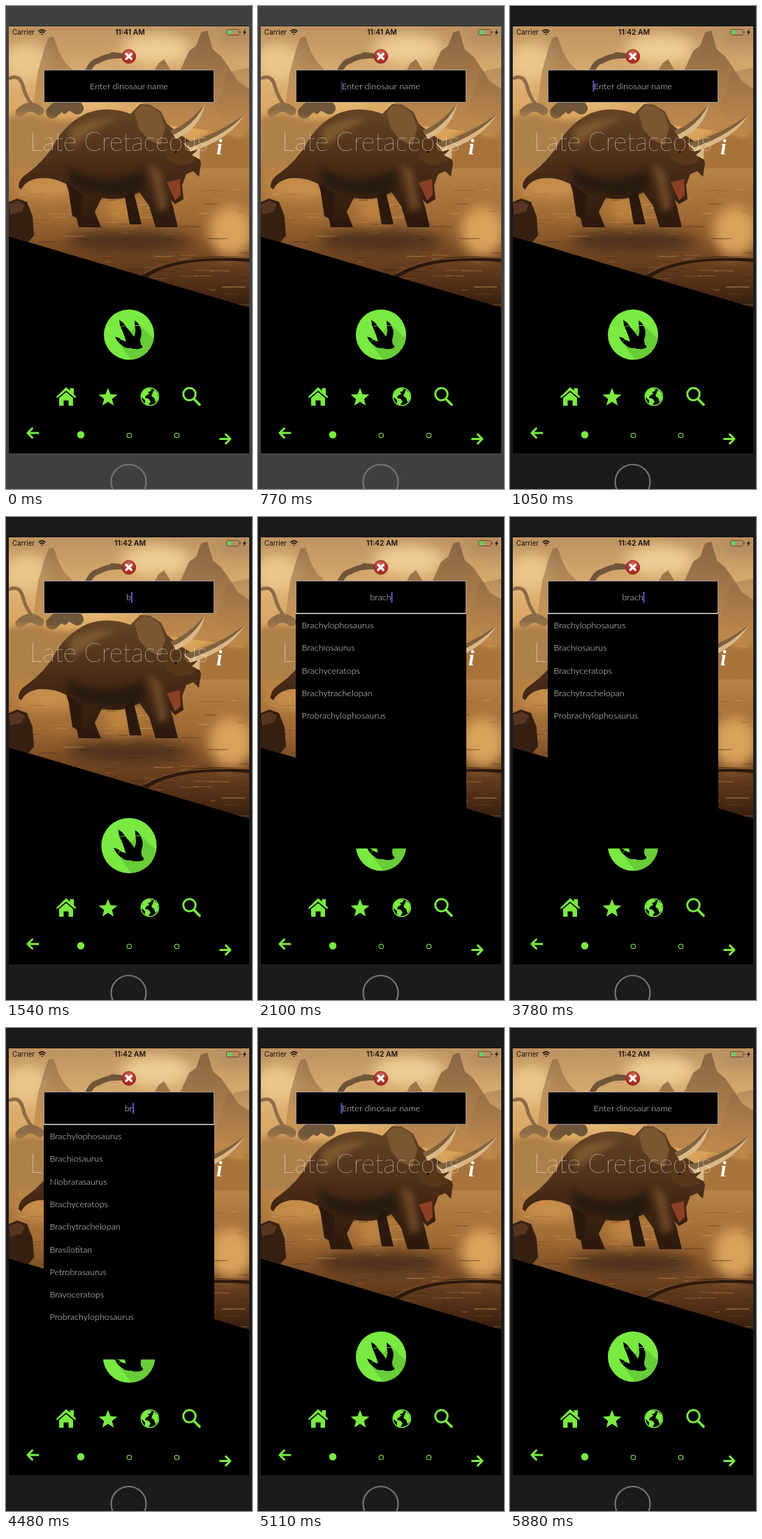
Recreate the animation shown at these times as an HTML page. Size 352x690 px, loop 5950 ms.

```html
<!DOCTYPE html>
<html lang="en">
<head>
<meta charset="utf-8">
<title>Dinosaur search</title>
<style>
  html, body { margin: 0; width: 100%; height: 100%; overflow: hidden; background: #1b1b1b; }
  svg { display: block; }
  .thin { font-family: Lato, "Open Sans", sans-serif; font-weight: 300; font-size: 12.6px; fill: #e2e2e2; }
  .title { font-size: 37px; font-weight: 200; fill: #fff; }
  .mid { text-anchor: middle; }
  .status { font-family: Inter, "Liberation Sans", sans-serif; font-size: 9.8px; fill: #16100a; }
  .bold { font-weight: 600; font-size: 10.3px; }
  .info { font: italic bold 31px "Liberation Serif", serif; fill: #fff; }
  .line { fill: none; stroke: #7aea42; stroke-linecap: round; stroke-linejoin: round; }
</style>
</head>
<body>
<svg width="352" height="690" viewBox="0 0 352 690">
  <defs>
    <clipPath id="scene"><path d="M4 29H348V431L4 329Z"/></clipPath>
    <clipPath id="disc"><circle r="36"/></clipPath>
    <filter id="soft" x="-30%" y="-30%" width="160%" height="160%"><feGaussianBlur stdDeviation="9"/></filter>
    <filter id="edge"><feGaussianBlur stdDeviation=".7"/></filter>
    <filter id="shade"><feGaussianBlur stdDeviation="4"/></filter>
    <linearGradient id="sky" x2="0" y2="1">
      <stop offset="0" stop-color="#bd9362"/>
      <stop offset=".35" stop-color="#dcae70"/>
      <stop offset=".7" stop-color="#d9a258"/>
      <stop offset="1" stop-color="#b27a3e"/>
    </linearGradient>
    <linearGradient id="water" x2="0" y2="1">
      <stop offset="0" stop-color="#b78245"/>
      <stop offset=".35" stop-color="#a06a34"/>
      <stop offset=".65" stop-color="#6d4220"/>
      <stop offset="1" stop-color="#331b0d"/>
    </linearGradient>
    <linearGradient id="hide" x2="0" y2="1">
      <stop offset="0" stop-color="#684626"/>
      <stop offset=".5" stop-color="#4a2d18"/>
      <stop offset="1" stop-color="#2b180c"/>
    </linearGradient>
    <linearGradient id="rock" x2="0" y2="1">
      <stop offset="0" stop-color="#846040"/>
      <stop offset="1" stop-color="#c08a4c"/>
    </linearGradient>
    <radialGradient id="red" cy=".3">
      <stop offset="0" stop-color="#d9705f"/>
      <stop offset="1" stop-color="#a92a22"/>
    </radialGradient>
  </defs>

  <rect id="bezel" width="352" height="690"/>
  <circle cx="175.5" cy="680" r="25" fill="none" stroke="#747474" stroke-width="2.2"/>
  <rect x="4" y="28.5" width="344" height="610.5"/>

  <g clip-path="url(#scene)">
    <rect x="4" y="29" width="344" height="225" fill="url(#sky)"/>
    <g filter="url(#soft)">
      <ellipse cx="28" cy="80" rx="34" ry="26" fill="#ebc68c"/>
      <ellipse cx="215" cy="62" rx="50" ry="22" fill="#edcb92"/>
      <ellipse cx="120" cy="125" rx="46" ry="24" fill="#e7b973"/>
      <ellipse cx="330" cy="42" rx="34" ry="14" fill="#b58c60"/>
      <ellipse cx="60" cy="190" rx="70" ry="26" fill="#e3ab60"/>
    </g>
    <g filter="url(#edge)" fill="url(#rock)">
      <path d="M38 150L46 92 56 58 61 45 68 44 76 66 84 80 96 92 112 150Z" opacity=".6"/>
      <path d="M188 165L206 104 218 82 226 76 236 92 248 95 262 64 272 57 279 38 288 35 296 62 308 72 322 92 332 108 348 118V185Z" opacity=".9"/>
      <path d="M300 150L316 96 328 92 348 88V190Z" opacity=".35"/>
    </g>
    <g filter="url(#edge)" fill="none" stroke="#6f5639" stroke-linecap="round">
      <path d="M84 150Q106 128 113 104T132 78Q144 71 158 71" stroke-width="8"/>
      <path d="M152 70L163 71" stroke-width="8"/>
      <path d="M66 152Q84 132 102 146" stroke-width="18"/>
      <path d="M6 103Q20 98 24 114T38 142" stroke="#8c6c48" stroke-width="5"/>
      <path d="M20 152Q34 138 48 150" stroke="#8c6c48" stroke-width="13"/>
    </g>
    <g filter="url(#shade)">
      <path d="M278 190Q300 172 322 182T352 170V245H270Z" fill="#a8733a"/>
      <path d="M0 160Q28 148 56 158T130 156V240H0Z" fill="#ae8048"/>
    </g>
    <rect x="4" y="232" width="344" height="202" fill="url(#water)"/>
    <g filter="url(#soft)">
      <ellipse cx="322" cy="322" rx="32" ry="36" fill="#d9a25c"/>
      <ellipse cx="60" cy="258" rx="46" ry="16" fill="#c98f4c"/>
      <ellipse cx="165" cy="285" rx="22" ry="24" fill="#bd8240"/>
      <ellipse cx="175" cy="336" rx="90" ry="16" fill="#50301a"/>
    </g>
    <g id="ripples" stroke-linecap="round"></g>

    <g filter="url(#edge)">
      <path fill="url(#hide)" d="M18 259Q17 247 32 238Q54 222 68 199Q84 168 116 153Q146 142 178 154
        L192 140 206 141 222 151 230 168 248 183 270 197 279 224 276 244 268 236 258 240
        252 256 254 276 242 283 229 270 222 257Q238 274 241 296L246 316H214L205 286 191 266
        Q166 280 137 274L127 294 136 316H104L97 285 86 254Q67 244 46 246Q28 249 22 262Z"/>
      <path fill="#2b190d" d="M182 262L194 312H177L170 272ZM88 254L95 300 106 306 110 270Z"/>
      <path fill="#7b5630" d="M184 152L193 142 207 143 220 153 228 174 221 199 203 191 190 175Z"/>
      <path fill="#583719" d="M224 186L248 192 266 205 272 222 250 228 231 219Z"/>
      <path fill="#8c3f24" d="M230 252L249 247 250 270 242 278Z"/>
      <path fill="#d9b887" d="M236 178Q264 166 285 139Q278 175 243 190ZM254 196Q303 184 343 153Q320 192 264 208ZM266 213L277 203 277 219Z"/>
      <path fill="#5c3c20" opacity=".7" d="M254 196Q303 184 343 153Q318 183 264 202ZM236 178Q264 166 285 139Q272 168 240 184Z"/>
      <circle cx="243" cy="208" r="2" fill="#17100a"/>
    </g>
    <g filter="url(#shade)" opacity=".65">
      <path fill="#1f1209" d="M88 230Q142 262 196 232L200 262Q156 280 92 256Z"/>
      <path fill="#916638" d="M90 178Q118 157 160 162Q128 172 96 202Z"/>
      <path fill="#825830" d="M205 224L222 238 232 288 218 294Z"/>
    </g>
    <g filter="url(#edge)">
      <path fill="#351f11" d="M0 282L16 275 30 280 38 300 40 328 24 346H0Z"/>
      <path fill="#573520" d="M4 283L17 278 27 284 22 294 6 298Z"/>
      <path fill="none" stroke="#2c190d" stroke-width="6" d="M188 394Q210 374 250 366T350 363"/>
      <path fill="none" stroke="#966437" stroke-width="1" d="M198 382Q226 366 262 362T350 360"/>
    </g>
  </g>

  <text class="status" x="9" y="41.3">Carrier</text>
  <text id="clock" class="status bold mid" x="177.5" y="41.3"></text>
  <g fill="none" stroke="#16100a" stroke-width="1.6">
    <path d="M46.5 36.2Q51.5 31.5 56.5 36.2M48.3 38.5Q51.5 35.4 54.7 38.5"/>
    <path d="M50 40L51.5 41.6 53 40Q51.5 38.8 50 40Z" fill="#16100a" stroke="none"/>
  </g>
  <rect x="315.5" y="33.5" width="18" height="8" rx="2" fill="none" stroke="#6b5136"/>
  <rect x="317" y="35" width="5.5" height="5" rx=".5" fill="#55d960"/>
  <path d="M335.3 36v3" stroke="#6b5136" stroke-width="1.4"/>
  <path d="M342.5 33L338.8 38.3H341L340 42.3 344 36.8H341.6Z" fill="#16100a"/>

  <text class="thin title" x="34" y="206.5">Late Cretaceous</text>
  <text class="info" x="301" y="211.5">i</text>

  <g id="paw">
    <circle r="36" fill="#7aea42"/>
    <g clip-path="url(#disc)">
      <path d="M12 -17L48 18V52H16L-12 16Z" fill="#68cd39"/>
    </g>
    <path d="M-20 3Q-14 4 -10 8L-4 10Q-7 0 -10 -7Q-13 -11 -14 -21Q-7 -17 -4 -11Q2 -5 7 3
      Q10 -3 9 -9Q8 -15 8 -20Q14 -17 16 -10Q19 -4 17 3Q15 9 17 14Q21 17 18 19Q10 22 2 19
      Q-5 20 -9 16Q-16 12 -20 3Z"/>
    <path d="M-13 -11L-5 -13M8 -13L15 -13M-14 10L-11 5" stroke="#7aea42" stroke-width=".8"/>
  </g>

  <g fill="#7aea42">
    <path d="M86 544.5L91.5 549.5V546H97V554.8L100.5 558.5Q100 560 98 559.5L86 549.5 74 559.5Q72 560 71.8 558.5Z"/>
    <path d="M76 560L86 551.5 96 560V571H89.5V563.5H82.5V571H76Z"/>
    <path id="star"/>
    <path d="M194 555Q196 548 203 546L209 547 206 551 203 551 205 554 200 557 199 560 204 561 207 565 203 571 199 568 199 563 194 559Z"/>
    <path d="M212 548L217 553 218 561 214 566 212 560 208 557 210 552Z"/>
    <circle cx="107" cy="612.5" r="5.2"/>
  </g>
  <g class="line" stroke-width="1.1">
    <circle cx="205.8" cy="558" r="12.6" stroke-width="1.5"/>
    <circle cx="176.3" cy="613.5" r="3.2"/>
    <circle cx="244.5" cy="613.5" r="3.2"/>
  </g>
  <g class="line" stroke-width="3">
    <circle cx="262.5" cy="554.5" r="8.8"/>
    <path d="M269 561.5L277 569.5" stroke-width="3.6"/>
    <path d="M46 610H31.5M37.5 603.5L31 610 37.5 616.5M306.5 618.5H321M314.5 612L321 618.5 314.5 625"/>
  </g>

  <rect id="panel" x="54" y="92" width="244" height="381.5"/>
  <rect x="54.5" y="91.5" width="243" height="46" stroke="#9a9a9a"/>
  <path id="rule" d="M54 137.7H298" stroke="#dcdcdc" stroke-width="1.4"/>
  <text id="hint" class="thin mid" x="176" y="119">Enter dinosaur name</text>
  <text id="typed" class="thin mid" x="175.5" y="119"></text>
  <rect id="caret" y="107" width="1.8" height="15.5" fill="#5a5fe6"/>
  <g id="list"></g>

  <circle cx="175.7" cy="72" r="10" fill="url(#red)" stroke="#7e231c" stroke-width=".8"/>
  <path d="M172 68.3L179.4 75.7M179.4 68.3L172 75.7" stroke="#fff" stroke-width="3.2" stroke-linecap="round"/>
</svg>

<script>
  const LOOP = 5950, FOCUS = 700, BLUR = 5500, MINUTE = 1050, LAG = 100;
  const keys = [
    [0, ''], [1470, 'b'], [1610, 'br'], [1750, 'bra'], [1890, 'brac'], [2030, 'brach'],
    [4130, 'brac'], [4270, 'bra'], [4410, 'br'], [4550, 'b'], [4690, '']
  ];
  const names = ['Brachylophosaurus', 'Brachiosaurus', 'Niobrarasaurus', 'Brachyceratops',
    'Brachytrachelopan', 'Brasilotitan', 'Petrobrasaurus', 'Bravoceratops', 'Probrachylophosaurus'];

  const el = id => document.getElementById(id);
  const show = (id, on) => el(id).setAttribute('visibility', on ? 'visible' : 'hidden');
  const write = (node, text) => { if (node.textContent !== text) node.textContent = text; };
  const add = (parent, tag, attrs) => {
    const node = document.createElementNS('http://www.w3.org/2000/svg', tag);
    for (const key in attrs) node.setAttribute(key, attrs[key]);
    return el(parent).appendChild(node);
  };

  let seed = 7;
  const rand = () => (seed = seed * 16807 % 2147483647) / 2147483647;
  for (let i = 0; i < 110; i++) {
    const x = rand() * 350, y = 262 + rand() * 165, w = 6 + rand() * 26;
    add('ripples', 'path', {
      d: `M${x} ${y}q${w / 2} ${rand() * 3 - 1.5} ${w} 0`, fill: 'none',
      stroke: rand() < .5 ? '#e0ab68' : '#3a2010',
      'stroke-width': .5 + rand(), opacity: .2 + rand() * .3
    });
  }

  const points = Array.from({ length: 10 }, (_, i) => {
    const r = i % 2 ? 6 : 14, a = Math.PI * (i / 5 - .5);
    return (146 + r * Math.cos(a)).toFixed(1) + ' ' + (559.5 + r * Math.sin(a)).toFixed(1);
  });
  el('star').setAttribute('d', 'M' + points.join('L') + 'Z');

  const rows = names.map((_, i) => add('list', 'text', { class: 'thin', x: 62.5, y: 159 + 32.3 * i }));
  const keyAt = t => keys.filter(k => k[0] <= t).pop() || keys[0];

  // A short swell, then rest
  const pulse = t => {
    const gap = Math.abs((t - 1540 + 472.5 + 1890) % 945 - 472.5);
    return gap < 180 ? 1 + .1 * Math.cos(gap / 180 * Math.PI / 2) ** 2 : 1;
  };

  function draw(t) {
    const late = t >= MINUTE;
    el('bezel').setAttribute('fill', late ? '#1b1b1b' : '#404040');
    write(el('clock'), late ? '11:42 AM' : '11:41 AM');
    el('paw').setAttribute('transform', `translate(176 469.5) scale(${pulse(t)})`);

    const [since, text] = keyAt(t);
    write(el('typed'), text);
    show('hint', !text);

    const query = keyAt(t - LAG)[1];
    const found = query ? names.filter(n => n.toLowerCase().includes(query)) : [];
    rows.forEach((row, i) => write(row, found[i] || ''));
    show('panel', query);
    show('rule', query);

    const blink = (t - Math.max(since, FOCUS)) % 840 < 500;
    show('caret', t >= FOCUS && t < BLUR && blink);
    el('caret').setAttribute('opacity', Math.min(1, (t - FOCUS) / 140));
    el('caret').setAttribute('x', text ? 175.5 + el('typed').getComputedTextLength() / 2 : 118.5);
  }

  const start = performance.now();
  function tick() {
    draw((performance.now() - start) % LOOP);
    requestAnimationFrame(tick);
  }
  draw(0);
  requestAnimationFrame(tick);
</script>
</body>
</html>
```
